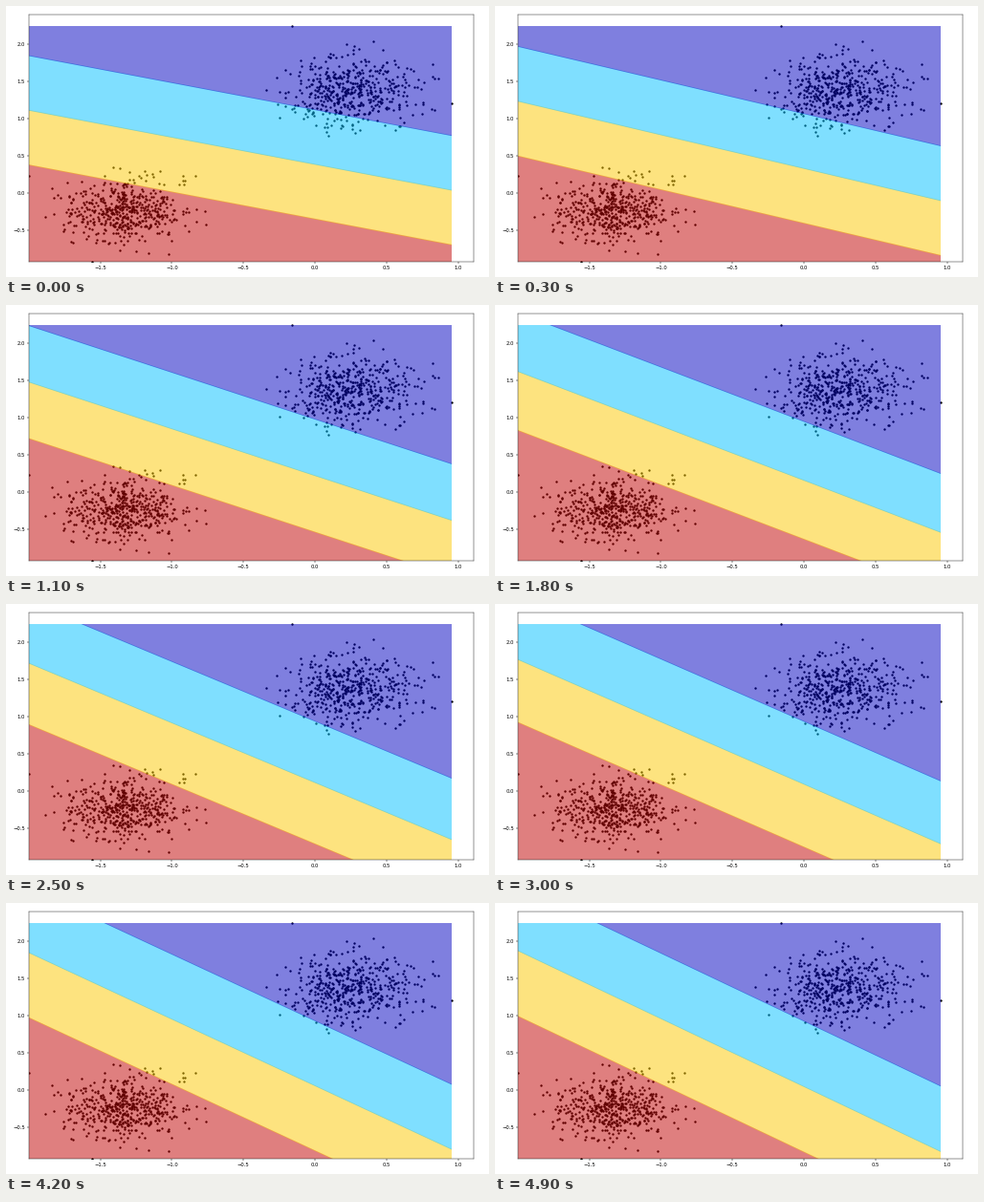
A matplotlib script for the animation above (5 s loop, 505 by 284 pixels).

```python
import numpy as np
import matplotlib.pyplot as plt
from matplotlib.animation import FuncAnimation
from matplotlib.patches import Polygon, Rectangle

W, H, DPI = 505, 284, 100
FRAMES, INTERVAL = 50, 100
LEFT, RIGHT, TOP, BOTTOM = 24, 489, 8.7, 268.3
ORIGIN = np.array([323.1, 195.8])
SCALE = np.array([149.7, -77.9])


def to_data(px):
    return (np.asarray(px, float) - ORIGIN) / SCALE


fig = plt.figure(figsize=(W / DPI, H / DPI), dpi=DPI, facecolor="white")
ax = fig.add_axes([LEFT / W, 1 - BOTTOM / H, (RIGHT - LEFT) / W, (BOTTOM - TOP) / H])
x_min, y_max = to_data((LEFT, TOP))
x_max, y_min = to_data((RIGHT, BOTTOM))
ax.set(xlim=(x_min, x_max), ylim=(y_min, y_max),
       xticks=np.arange(-1.5, 1.1, 0.5), yticks=np.arange(-0.5, 2.1, 0.5))
ax.tick_params(labelsize=3.75, length=1.3, width=0.35, pad=1.4)
for spine in ax.spines.values():
    spine.set(linewidth=0.35, edgecolor="#222222")

# The shaded region spans the data, so one point touches each of its sides
right, top = to_data((466, 21))
extremes = [(x_min, 0.23), (-1.56, y_min), (-0.16, top), (right, 1.21)]


def cluster(rng, center, count=500, spread=0.22):
    pts = rng.normal(center, spread, (count, 2))
    inside = (pts > (x_min, y_min)) & (pts < (right, top))
    return pts[inside.all(axis=1)]


rng = np.random.default_rng(7)
points = np.vstack([cluster(rng, (-1.33, -0.21)), cluster(rng, (0.24, 1.38)), extremes])
ax.scatter(*points.T, s=2.9, c="black", linewidths=0, zorder=1)

# Decision bands, translucent over the points
region = Rectangle((x_min, y_min), right - x_min, top - y_min, transform=ax.transData)
bands = []
for color in ["#c10000", "#fdc900", "#00c0ff", "#0000c1"]:
    band = Polygon(np.zeros((4, 2)), facecolor=color, alpha=0.5, linewidth=0, zorder=2)
    ax.add_patch(band)
    band.set_clip_path(region)
    bands.append(band)

PIVOT = -0.522  # the middle line turns about this x
SEAM = 0.005    # neighbouring bands overlap slightly
FAR = 9


def boundary(t):
    """Slope, height at the pivot and spacing of the lines as training settles."""
    slope = -0.957 + 0.593 * np.exp(-t / 1.85)
    middle = 0.518 + 0.055 * np.exp(-t / 1.7)
    gap = 0.885 - 0.15 * np.exp(-(t / 2.6) ** 2)
    return slope, middle, gap


def update(frame):
    slope, middle, gap = boundary(frame * INTERVAL / 1000)
    xs = np.array([x_min, right])
    center = middle + slope * (xs - PIVOT)
    offsets = [-FAR, -gap, 0, gap, FAR]
    for band, low, high in zip(bands, offsets, offsets[1:]):
        lower = np.column_stack([xs, center + low - SEAM])
        upper = np.column_stack([xs, center + high + SEAM])
        band.set_xy(np.vstack([lower, upper[::-1]]))
    return bands


anim = FuncAnimation(fig, update, frames=FRAMES, interval=INTERVAL, repeat=True)
plt.show()
```
